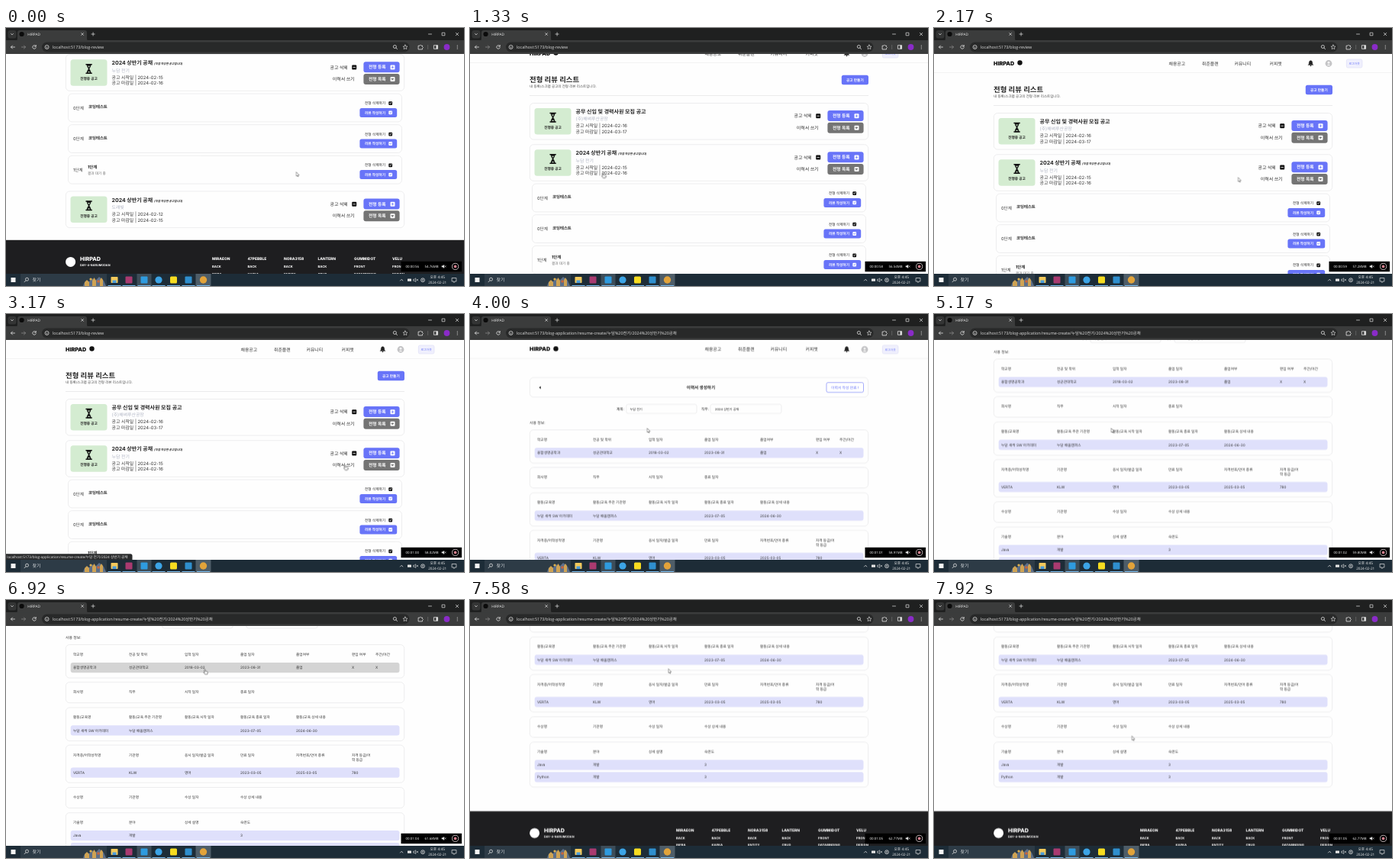
These frames come from a looping animation (600 by 338 pixels, 8000 ms). An HTML page:

```html
<!DOCTYPE html>
<html lang="ko">
<head>
<meta charset="utf-8">
<title>HIRPAD</title>
<style>
  html, body { margin: 0; width: 100%; height: 100%; overflow: hidden; background: #fefefe; }
  svg { display: block; width: 600px; height: 338px; text-rendering: geometricPrecision; }
  text { white-space: pre; }
  .page { font-family: Inter, "Noto Sans CJK KR", "Noto Sans CJK JP", "Noto Sans CJK", sans-serif; }
  .system { font-family: "Open Sans", "Noto Sans CJK KR", "Noto Sans CJK JP", "Noto Sans CJK", sans-serif; }
</style>
</head>
<body>
<script>
const INK = '#222', BLUE = '#6874f8', GREY = '#747474', LINE = '#e3e3e5', LILAC = '#dfe0fb';
const FOOTER = '#1e1e20', LIGHT = '#e4e4e4';

// Drawing helpers; text is placed by its left edge and vertical centre.
const text = (str, x, cy, size, fill = INK, weight = 400, more = '') =>
  `<text x="${x}" y="${cy + size * 0.36}" font-size="${size}" fill="${fill}" font-weight="${weight}" ${more}>${str}</text>`;
const rect = (x, y, w, h, fill, r = 0, stroke = 'none', more = '') =>
  `<rect x="${x}" y="${y}" width="${w}" height="${h}" rx="${r}" fill="${fill}" stroke="${stroke}" stroke-width=".6" ${more}/>`;
const circle = (x, y, r, fill, stroke = 'none') =>
  `<circle cx="${x}" cy="${y}" r="${r}" fill="${fill}" stroke="${stroke}" stroke-width=".8"/>`;
const path = (d, stroke, fill = 'none', width = 0.8) =>
  `<path d="${d}" stroke="${stroke}" fill="${fill}" stroke-width="${width}" stroke-linecap="round" stroke-linejoin="round"/>`;
const group = (id, body, more = '') => `<g id="${id}" ${more}>${body}</g>`;
const outline = (x, y, w, h, r = 5) => rect(x, y, w, h, '#fefefe', r, LINE);

const siteHeader = () =>
  text('HIRPAD', 78, 46, 7.2, '#111', 900) + circle(112.5, 45.5, 3.2, '#111') +
  [['채용공고', 307.5], ['취준플랜', 351], ['커뮤니티', 393.5], ['커피챗', 439.5]]
    .map(([label, x]) => text(label, x, 46.5, 5.9, '#333')).join('') +
  path('M490.4 48.3c1-1 .8-2 1-3.5c.5-2.6 3.7-2.6 4.2 0c.2 1.5 0 2.5 1 3.5z', INK, INK, 0.5) +
  circle(493.5, 49.4, 0.8, INK) +
  circle(517, 46.5, 4.4, '#c4c4c6') + circle(517, 45.3, 1.5, '#f3f3f3') + path('M514.7 49.2q2.3-3.4 4.6 0z', 'none', '#f3f3f3') +
  rect(540.3, 41, 20.7, 11, '#f0f0fd', 2, '#dcdcf5') + text('로그아웃', 550.6, 46.5, 3.9, BLUE, 500, 'text-anchor="middle"') +
  rect(0, 58, 600, 0.6, '#ebebeb');

const footer = top => {
  const columns = [
    [270, 'MIRAEON', 'BACK', 'INFRA'], [316.5, '47PEBBLE', 'BACK', 'KAFKA'],
    [364, 'NORA3158', 'BACK', 'ENTITY'], [408.5, 'LANTERN', 'BACK', 'CRUD'],
    [456, 'GUMMIDOT', 'FRONT', 'DATABINDING'], [506, 'VELU', 'FRONT', 'DESIGN']
  ];
  return rect(0, top, 600, 80, FOOTER) + circle(84.6, top + 28.6, 6.5, '#fff') +
    text('HIRPAD', 97, top + 24.8, 7.2, '#fff', 800) +
    text('DAY-4-NARUMODAN', 97, top + 33.3, 3.8, '#fff', 700) +
    columns.map(([x, name, ...tasks]) => text(name, x, top + 24.5, 4.9, '#fff', 800) +
      tasks.map((task, i) => text(task, x, top + 35.1 + i * 9.4, 4.2, '#fff', 700)).join('')).join('');
};

// Small square icon with a sign drawn in it.
const icon = (x, cy, size, fill, ink, sign) => {
  const c = x + size / 2, a = size * 0.22;
  const signs = {
    minus: `M${c - a} ${cy}h${2 * a}`,
    plus: `M${c - a} ${cy}h${2 * a}M${c} ${cy - a}v${2 * a}`,
    down: `M${c - a} ${cy - a / 2}h${2 * a}l${-a} ${a * 1.3}z`,
    check: `M${c - a} ${cy}l${a * 0.8} ${a * 0.8}l${a * 1.2} ${-a * 1.8}`
  };
  return rect(x, cy - size / 2, size, size, fill, 1) + path(signs[sign], ink, sign === 'down' ? ink : 'none', 0.75);
};

const jobCard = (y, title, company, start, end, manual) =>
  outline(78.3, y, 443.4, 47.6) + rect(84.5, y + 6.5, 48, 34.5, '#d4ecd1', 3.5) +
  path(`M105 ${y + 13}h7.2M105 ${y + 24.5}h7.2`, '#111', 'none', 1.5) +
  path(`M106 ${y + 13}h5.2c0 3.5-2 4.5-2 5.7s2 2.3 2 5.8h-5.2c0-3.5 2-4.6 2-5.8s-2-2.2-2-5.7z`, '#111', '#111', 0.5) +
  path(`M107.2 ${y + 15}h2.8l-1.4 2zM107.2 ${y + 23.5}q1.4-3 2.8 0z`, 'none', '#d4ecd1') +
  text('진행중 공고', 108.5, y + 32, 4.7, INK, 700, 'text-anchor="middle"') +
  text(title, 138.5, y + 11, 7, INK, 700) +
  (manual ? text('(직접 작성한 공고입니다)', 194, y + 12.3, 3.6, INK, 700, 'font-style="italic"') : '') +
  text(company, 138.5, y + 20.8, 5.9, '#b0b5c4') +
  text('공고 시작일 | ' + start, 138.5, y + 29.7, 5.9, '#333') +
  text('공고 마감일 | ' + end, 138.5, y + 37.5, 5.9, '#333') +
  text('공고 삭제', 424.5, y + 16.8, 5.9, INK, 500) + icon(453.2, y + 16.8, 6, '#111', '#fff', 'minus') +
  text('이력서 쓰기', 427.8, y + 32.2, 5.9, INK, 500) +
  rect(468.4, y + 9.6, 47.2, 14, BLUE, 3) + text('전형 등록', 475, y + 16.7, 5.8, '#fff', 700) + icon(503.5, y + 16.7, 6, '#fff', BLUE, 'plus') +
  rect(468.4, y + 25.2, 47.2, 14, GREY, 3) + text('전형 목록', 475, y + 32.2, 5.8, '#fff', 700) + icon(503.5, y + 32.2, 6, '#fff', GREY, 'down');

const stepCard = (y, stage, title, note) =>
  outline(81.5, y, 437, 36.8) + text(stage, 88, y + 18.5, 5.6, '#333') +
  text(title, note ? 107 : 108, y + (note ? 15 : 17.2), 5.4, INK, 700) +
  (note ? text(note, 107, y + 22.7, 4.6, '#666') : '') +
  text('전형 삭제하기', 470, y + 12.5, 4.7, INK, 500) + icon(501.3, y + 12.5, 4.8, '#111', '#fff', 'check') +
  rect(463.4, y + 18.8, 48.8, 12, BLUE, 2.5) + text('리뷰 작성하기', 470, y + 24.8, 4.7, '#fff', 700) + icon(501.3, y + 24.8, 4.8, '#fff', BLUE, 'check');

const reviewPage = siteHeader() +
  text('전형 리뷰 리스트', 78, 80.5, 9.4, INK, 600) +
  text('내 등록/스크랩 공고의 전형 리뷰 리스트입니다.', 78, 89.5, 4.5, '#444') +
  rect(486.8, 74.8, 35.2, 12.4, BLUE, 2.5) + text('공고 만들기', 504.4, 81, 4.7, '#fff', 700, 'text-anchor="middle"') +
  rect(78, 101.3, 444, 0.6, '#dedee0') +
  jobCard(111.5, '공무 신입 및 경력사원 모집 공고', '(주)해벼루산공장', '2024-02-16', '2024-03-17') +
  jobCard(165.7, '2024 상반기 공채', '누담 전기', '2024-02-15', '2024-02-16', true) +
  stepCard(217.1, '0단계', '코딩테스트') +
  stepCard(257.7, '0단계', '코딩테스트') +
  stepCard(298.3, '1단계', '1단계', '결과 대기 중') +
  jobCard(345, '2024 상반기 공채', '도래빛', '2024-02-12', '2024-02-15', true) +
  footer(408.8);

const COLUMNS = [88, 161, 234, 307, 380, 453, 484];
const cells = (list, cy, weight) => list.map((cell, i) => text(cell, COLUMNS[i], cy, 4.7, '#333', weight)).join('');
const table = (y, h, head, rows = [], rowY = 0, id = '') =>
  outline(78.3, y, 443.4, h) + cells(head, y + 12.8, 500) +
  rows.map((row, i) => rect(84.7, rowY - 6.8 + i * 16, 430.8, 13.4, LILAC, 3, 'none', id && `id="${id}"`) + cells(row, rowY + i * 16)).join('');

const resumePage = group('resumeHeader', siteHeader(), 'transform="translate(0 -45.3)"') +
  outline(78.3, 38, 443.4, 25.6) + path('M92.7 49.3v3.6l-2.2-1.8z', 'none', '#111') +
  text('이력서 생성하기', 302.5, 51, 5.6, INK, 700, 'text-anchor="middle"') +
  rect(467, 44.5, 48.5, 12.8, '#fff', 2, BLUE) + text('이력서 작성 완료 !', 491.2, 51, 4.8, BLUE, 500, 'text-anchor="middle"') +
  text('제목:', 192, 79, 4.7) + outline(204.8, 73, 92.2, 12, 2.5) + text('누담 전기', 209.5, 79.3, 4.1) +
  text('직무:', 303, 79, 4.7) + outline(315, 73, 93, 12, 2.5) + text('2024 상반기 공채', 321, 79.3, 4.1) +
  text('사용 정보:', 78, 97.5, 4.9, '#333') +
  table(106.5, 43.6, ['학교명', '전공 및 학위', '입학 일자', '졸업 일자', '졸업여부', '편입 여부', '주간/야간'],
    [['융합생명공학과', '성균관대학교', '2018-03-02', '2023-08-31', '졸업', 'X', 'X']], 136.7, 'hoverRow') +
  table(155.7, 27, ['회사명', '직무', '시작 일자', '종료 일자']) +
  table(189, 43.6, ['활동/교육명', '활동/교육 주관 기관명', '활동/교육 시작 일자', '활동/교육 종료 일자', '활동/교육 상세 내용'],
    [['누담 새싹 SW 아카데미', '누담 배움캠퍼스', '', '2023-07-05', '2024-06-30']], 219) +
  table(238.1, 49.2, ['자격증/어학성적명', '기관명', '응시 일자/발급 일자', '만료 일자', '자격번호/언어 종류', '자격 등급/어'],
    [['VERTA', 'KLW', '영어', '2023-03-05', '2025-03-05', '780']], 274.2) +
  text('학 등급', 453, 257, 4.7, '#333', 500) +
  table(293.5, 27, ['수상명', '기관명', '수상 일자', '수상 상세 내용']) +
  table(326.7, 59, ['기술명', '분야', '상세 설명', '숙련도'], [['Java', '개발', '', '3'], ['Python', '개발', '', '3']], 356.7) +
  footer(417.3);

const HOST = 'localhost:5173', RESUME = '/blog-application/resume-create/';
const url = rest => text(HOST + rest, 61, 25, 5.4, '#dedede');
const browser = rect(0, 0, 600, 17, '#1f2020') + rect(0, 16, 600, 18, '#3b3c3c') +
  rect(2.5, 3, 11, 10.5, '#343535', 3) + path('M6.6 7.5l1.4 1.4l1.4-1.4', LIGHT) +
  path('M13 16.5q2 0 2-2.5v-8q0-3 3-3h85q3 0 3 3v8q0 2.5 2 2.5z', 'none', '#3b3c3c') +
  circle(20.6, 8, 3.1, '#0b0b0b') + text('HIRPAD', 28.2, 8.2, 4.7, '#f0f0f0') +
  path('M98.7 6.6l2.8 2.8m0-2.8l-2.8 2.8M112 8h4.2M114.1 5.9v4.2', LIGHT, 'none', 0.7) +
  path('M553.5 8h4M571.5 6.2h3.4v3.6h-3.4zM589.3 6.3l3.5 3.5m0-3.5l-3.5 3.5', LIGHT, 'none', 0.7) +
  path('M11.5 25h-5m2-2l-2 2l2 2', LIGHT) + path('M20.5 25h5m-2-2l2 2l-2 2', '#8a8a8a') +
  path('M39 23.6a2.3 2.3 0 1 0 .3 2.2M39.3 22.5v1.7h-1.7', LIGHT) +
  rect(47, 18.6, 481.5, 12.8, '#282929', 6.4) + circle(53.6, 25, 2.5, 'none', LIGHT) + path('M53.6 24.8v1.3', LIGHT) +
  circle(509.4, 24.5, 2, 'none', LIGHT) + path('M510.9 26l1.7 1.7', LIGHT) +
  path('M523 22l.9 2l2.1.2l-1.6 1.4l.5 2.1l-1.9-1.1l-1.9 1.1l.5-2.1l-1.6-1.4l2.1-.2z', LIGHT, 'none', 0.6) +
  path('M540.5 23.2h1.5q1-2 2 0h1.5v1.4q2 1 0 2v1.4h-5z', LIGHT) + rect(552.5, 22, 0.6, 6, '#777') +
  path('M560.8 22.7h4.8v4.6h-4.8z', LIGHT) + rect(563.5, 22.7, 2.1, 4.6, LIGHT) +
  circle(577.5, 25, 3.9, '#8a2bc8') + [23, 25, 27].map(y => circle(591.3, y, 0.6, LIGHT)).join('') +
  group('urlReview', url('/blog-review')) + group('urlResume', url(RESUME + '누담%20전기/2024%20상반기%20공채'));

const statusBar = path('M0 314.3h163q2.5 0 2.5 2.5v5.5h-165.5z', 'none', '#2a2b2c') +
  text(HOST + RESUME + '누담 전기/2024 상반기 공채', 1.3, 318.3, 4.7, '#e8e8e8');

const openApps = [142, 161, 181, 200, 219.5, 239, 258.5];
const taskbar = rect(0, 322, 600, 16, '#1d2c37') + rect(19, 322, 113, 16, '#2d3b46') +
  rect(6.5, 327, 6, 6, '#f4f4f4') + circle(27.5, 329.2, 2, 'none', LIGHT) + path('M26 330.8l-2 2', LIGHT) +
  text('찾기', 34.5, 330.2, 6, '#d4d8dc') +
  path('M101 338q2-9 8-6l4-4l4 3l5-5l6 5l3 7z', 'none', '#5c6f8a') +
  path('M103 338v-5l3-3l3 3v5zM113 338v-7l2.5-4l2.5 4v7zM123 338v-8l2-3l2 3v8z', 'none', '#cfa353') +
  circle(111, 329, 1.6, '#e0b14c') + circle(121, 332, 1.8, '#c9663c') +
  rect(171.5, 322, 19, 16, '#3d4d59') + rect(248.5, 322, 20, 16, '#4e5d68') +
  openApps.map(x => rect(x - 8.5, 337, 17, 1, '#76b9ed')).join('') +
  rect(137.5, 326, 9, 8, '#f3c95b', 0.8) + rect(139.5, 330.5, 5, 3.5, '#4b9ddb') +
  rect(156.5, 325.5, 9, 9, '#a93a70', 1) + rect(176.5, 325.5, 9, 9, '#2f9bdf', 1) + circle(200, 330, 4.6, '#3ca4e6') +
  rect(215, 325.5, 9, 9, '#f6dc20', 1.5) + rect(234.5, 325.5, 9, 9, '#2f8fce', 1) + circle(258.5, 330, 4.7, '#e2a33a') +
  path('M516.5 331l1.7-1.7l1.7 1.7', LIGHT) + rect(526, 328.4, 5, 3.4, LIGHT, 0.5) +
  path('M534 329.2h1.2l1.5-1.4v4.8l-1.5-1.4h-1.2zM538 329.2l1.7 1.8m0-1.8l-1.7 1.8', LIGHT, 'none', 0.6) +
  circle(546, 330.2, 2.4, 'none', LIGHT) + path('M544.9 329.1l2.2 2.2m0-2.2l-2.2 2.2', LIGHT, 'none', 0.6) +
  text('오후 4:45', 565.2, 326.6, 4.8, '#f2f2f2', 400, 'text-anchor="middle"') +
  text('2024-02-21', 565.2, 333.7, 4.6, '#f2f2f2', 400, 'text-anchor="middle"') +
  path('M584.5 327.5h5.4v4.5h-1.8l-1.2 1.5v-1.5h-2.4z', LIGHT, 'none', 0.7);

const recordedSize = [54.76, 55.65, 56.54, 57.28, 58.02, 58.91, 59.80, 60.74, 61.68, 62.77];
const clock = s => `00:${String(s / 60 | 0).padStart(2, '0')}:${String(s % 60).padStart(2, '0')}`;
const recorder = rect(517.5, 305.8, 79.5, 13.4, '#000') +
  recordedSize.map((mb, i) => group('readout' + i,
    text(clock(56 + i), 523.5, 312.5, 4.4, '#fff') + text(mb.toFixed(2) + 'MB', 548.5, 312.5, 4.4, '#fff'))).join('') +
  path('M571.3 311.7h1l1.5-1.3v4l-1.5-1.3h-1zM575 311.7l1.2 1.4m0-1.4l-1.2 1.4', '#fff', '#fff', 0.5) +
  circle(588.6, 312.4, 4.1, '#000', '#eddfe2') + circle(588.6, 312.4, 1.9, '#d27f8c');

const pointer = group('arrow', path('M0 0v5.2l1.2-1.1l.8 1.9l.8-.4l-.8-1.8h1.6z', '#333', '#fff', 0.45)) +
  group('hand', path('M0 .4q.7-.7 1.2.2v2.2l2.6.6q.7.3.5 1.1l-.4 2.3h-3.2l-2-2.5q.2-.9 1.3-.1z', '#222', '#fff', 0.5));

document.body.innerHTML = `<svg viewBox="0 0 600 338">${rect(0, 0, 600, 338, '#fefefe')}
  ${group('review', reviewPage, 'class="page"')}${group('resume', resumePage, 'class="page"')}
  <g class="system">${browser}${group('status', statusBar)}${taskbar}${recorder}</g>${group('pointer', pointer)}</svg>`;

// The picture is held for 1/12 s at a time; all tables below count in these ticks.
const DURATION = 8000, TICKS = 96;
const tickStart = k => Math.max(0, Math.round(k * 25 / 3) * 10 - 2);
const animate = (id, styleAt) => document.getElementById(id).animate(
  Array.from({ length: TICKS }, (_, k) => ({ ...styleAt(k), offset: tickStart(k) / DURATION, easing: 'steps(1)' })),
  { duration: DURATION, iterations: Infinity });

const valueAt = (points, k, i = 1) => {
  const next = points.findIndex(p => p[0] > k);
  if (next < 0) return points[points.length - 1][i];
  const a = points[next - 1], b = points[next];
  return a[i] + (b[i] - a[i]) * (k - a[0]) / (b[0] - a[0]);
};
const move = (x, y) => ({ transform: `translate(${x}px, ${y}px)` });
const showWhen = (id, test) => animate(id, k => ({ opacity: test(k) ? 1 : 0 }));
const between = (a, b) => k => k >= a && k < b;

const NAVIGATE = 40;
const reviewScroll = [[0, 131], [12, 131], [13, 102], [14, 64], [15, 33], [16, 13], [17, 3], [18, 0]];
const resumeScroll = [[0, -45.3], [54, -45.3], [55, -38], [56, -20], [57, -6], [58, 0], [59, 6], [60, 24], [61, 41], [62, 47.5], [63, 48],
  [85, 48], [86, 62], [87, 90], [88, 112], [89, 129], [90, 138], [91, 140.6]];
const pointerPath = [[0, 380.3, 189], [4, 380.3, 189], [10, 173.5, 189.5], [21, 173.5, 189.5], [27, 443.5, 197.5], [41, 443.5, 197.5],
  [48, 232.2, 150], [71, 232.2, 150], [76, 260, 90.5], [91, 260, 90.5], [94, 259.3, 178.5]];

animate('review', k => ({ ...move(0, -valueAt(reviewScroll, k)), opacity: k < NAVIGATE ? 1 : 0 }));
animate('resume', k => ({ ...move(0, -valueAt(resumeScroll, k)), opacity: k < NAVIGATE ? 0 : 1 }));
animate('pointer', k => move(valueAt(pointerPath, k), valueAt(pointerPath, k, 2)));
animate('hoverRow', k => ({ fill: between(76, 86)(k) ? '#d4d4d4' : LILAC }));

const overLink = k => between(10, 22)(k) || between(27, 41)(k) || between(76, 86)(k);
showWhen('hand', overLink);
showWhen('arrow', k => !overLink(k));
showWhen('urlReview', k => k < NAVIGATE);
showWhen('urlResume', k => k >= NAVIGATE);
showWhen('status', between(27, 42));
recordedSize.forEach((_, i) => showWhen('readout' + i, k => Math.floor(k * 0.1 + 0.45) === i));
</script>
</body>
</html>
```
